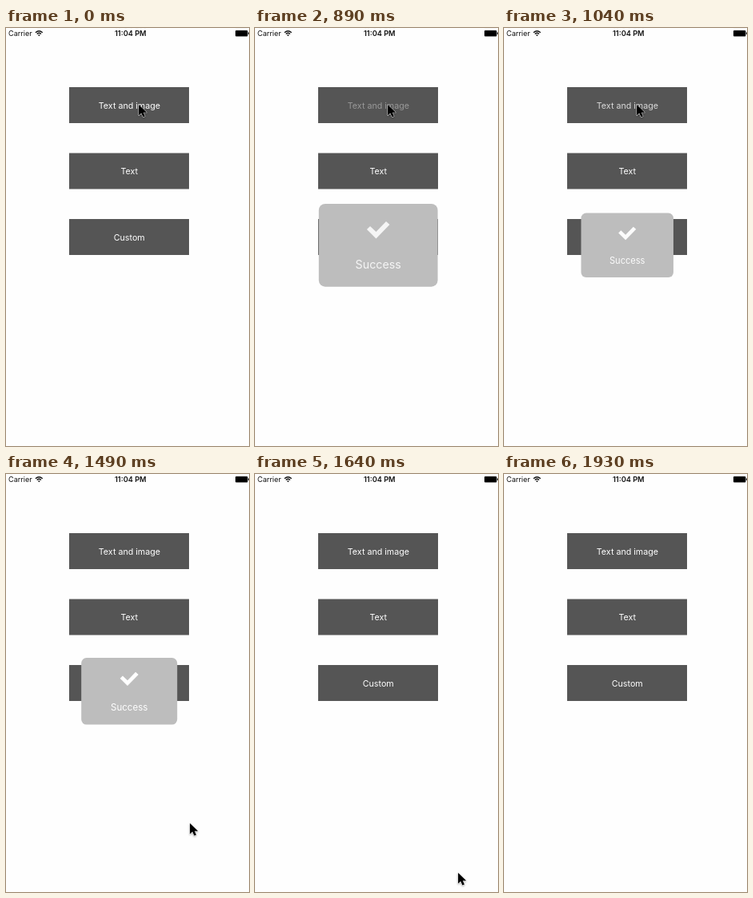
An HTML page that plays this animation: 304x523 px, repeating every 2.52 s.

```html
<!DOCTYPE html>
<html lang="en">
<head>
<meta charset="utf-8">
<title>Toast demo</title>
<style>
  html, body { margin: 0; height: 100%; overflow: hidden; background: #fefefe; }
  svg { display: block; width: 100vw; height: 100vh; }
  text { font: 10.7px Inter, "Open Sans", sans-serif; text-anchor: middle; fill: #fff; }
  .bar text { font-size: 9.1px; fill: #111; }
  .bar .clock { font-size: 9.2px; font-weight: 600; }
  .bar .carrier { text-anchor: start; }
  #toast text { font-size: 11.5px; }
  #cursor { filter: drop-shadow(0 1px .8px #0005); }
</style>
</head>
<body>
<svg viewBox="0 0 304 523">
  <g class="bar">
    <text class="carrier" x="3" y="10">Carrier</text>
    <g fill="none" stroke="#111" stroke-width="1.4">
      <path d="M36.9 5.7Q41.3 1.9 45.7 5.7M38.7 7.5Q41.3 5.2 43.9 7.5"/>
      <path d="M41.3 10.2L39.8 8.7Q41.3 7.6 42.8 8.7Z" fill="#111" stroke="none"/>
    </g>
    <text class="clock" x="155.8" y="10">11:04 PM</text>
    <rect x="287" y="3" width="15.4" height="7.4" rx="1"/>
    <rect x="302.8" y="5.3" width="1" height="2.8" rx=".4"/>
  </g>

  <g fill="#555">
    <rect x="79" y="74" width="150" height="45"/>
    <rect x="79" y="156.5" width="150" height="45"/>
    <rect x="79" y="239" width="150" height="45"/>
  </g>
  <text id="label" x="154.4" y="100.6">Text and image</text>
  <text x="154.2" y="183.1">Text</text>
  <text x="154.2" y="265.6">Custom</text>

  <g id="toast">
    <rect x="-60" y="-41.8" width="120" height="83.6" rx="6.5" fill="#bdbdbd"/>
    <g id="content">
      <path d="M-11.5-16L-8.2-19.2L-2.2-13.5L7.9-24L11.5-20.8L-2.2-6.7Z" fill="#fff"/>
      <text y="23.9">Success</text>
    </g>
  </g>

  <path id="cursor" d="M1.1 1V14.6L4.3 11.6L6.4 16.6L9 15.5L6.9 10.7H11.2Z"
        stroke="#fff" stroke-width="1" paint-order="stroke"/>
</svg>
<script>
  const LOOP = 2520;
  const $ = id => document.getElementById(id);

  // Each track is a list of [start time, value], held until the next entry.
  const labelAlpha = [[0, 1], [740, .2], [890, .4], [1040, .78], [1190, 1]];
  const toastScale = [[0, 0], [890, 1.24], [1040, .9625], [1190, 1], [1640, 0]];
  const contentAlpha = [[0, .85], [1040, .95], [1190, 1]];
  const cursorPos = [[0, [165, 95]], [1340, [209, 324]], [1490, [229, 436]],
                     [1640, [253, 498]], [1780, [265, 520]], [1930, [265, 540]]];

  const at = (track, t) => track.filter(([start]) => start <= t).pop()[1];

  function draw(now) {
    const t = now % LOOP;
    const scale = at(toastScale, t);
    $('label').setAttribute('fill-opacity', at(labelAlpha, t));
    $('toast').setAttribute('visibility', scale ? 'visible' : 'hidden');
    $('toast').setAttribute('transform', `translate(154.2 271.8) scale(${scale})`);
    $('content').setAttribute('opacity', at(contentAlpha, t));
    $('cursor').setAttribute('transform', `translate(${at(cursorPos, t)})`);
  }

  const start = performance.now();
  function tick() {
    draw(performance.now() - start);
    requestAnimationFrame(tick);
  }
  tick();
</script>
</body>
</html>
```
